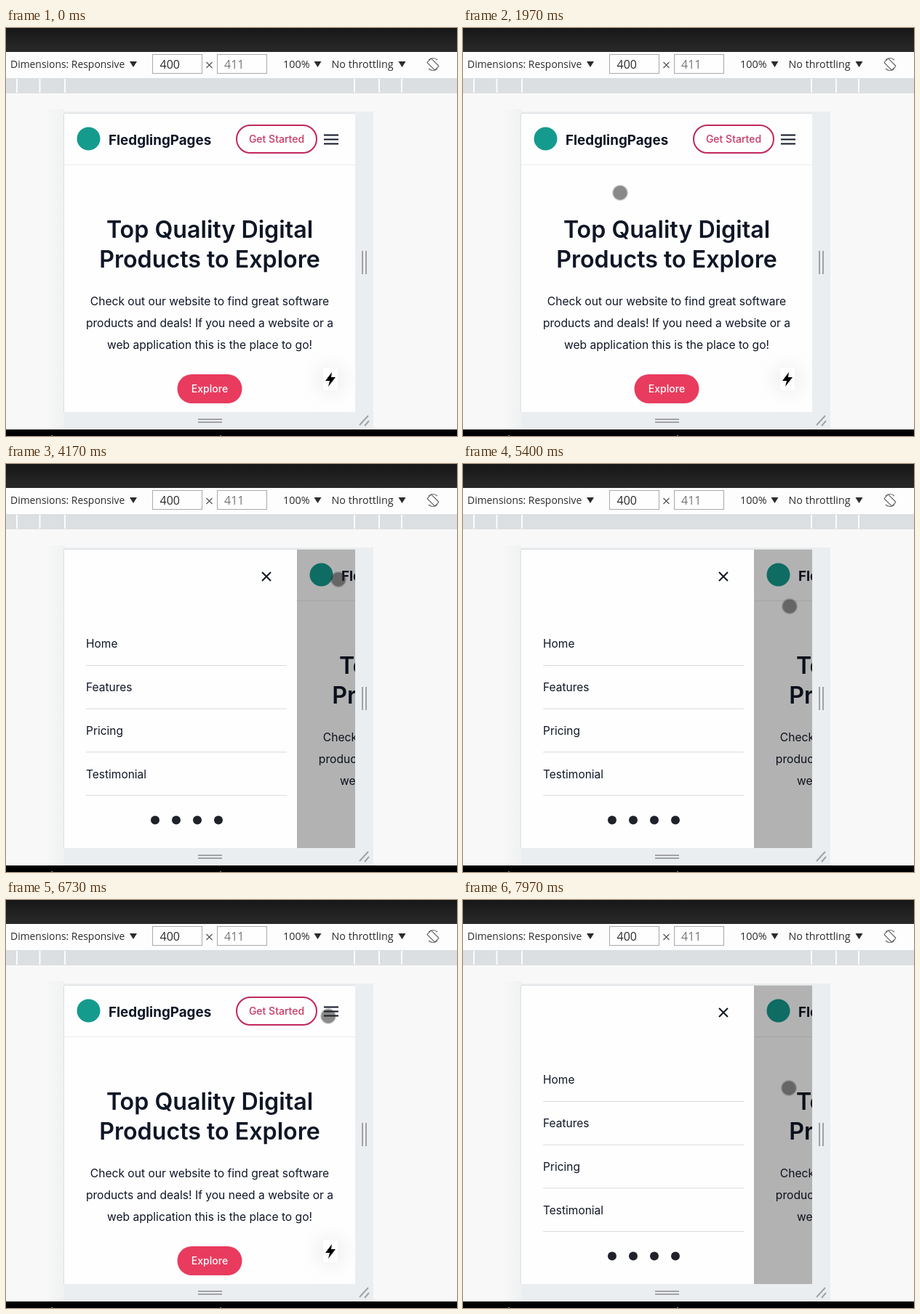
Recreate the animation shown at these times as an HTML page. Size 620 px wide and 562 px high, loop 8 s.

```html
<!DOCTYPE html>
<html lang="en">
<head>
<meta charset="utf-8">
<title>Responsive drawer menu</title>
<style>
  html, body { margin: 0; width: 100%; height: 100%; overflow: hidden; background: #f8f8f8; }
  svg { display: block; width: 620px; height: 562px; }
  .bar { font: 13.9px "Open Sans", "Noto Sans", sans-serif; fill: #2b2b2e; }
  .size { font-size: 16px; }
  .page { font-family: Inter, sans-serif; fill: #0f1626; }
  .brand { font-size: 18.8px; font-weight: 700; }
  .title { font-size: 32.2px; font-weight: 600; }
  .copy { font-size: 15.6px; }
  .button { font-size: 14px; font-weight: 500; }
  .middle { text-anchor: middle; }
  .grip { stroke: #a2a2a6; stroke-width: 2; fill: none; }
</style>
</head>
<body>
<svg viewBox="0 0 620 562">
  <defs>
    <clipPath id="screen"><rect x="80" y="118" width="400" height="411"/></clipPath>
    <linearGradient id="topbar" x2="0" y2="1">
      <stop stop-color="#171717"/><stop offset="1" stop-color="#292929"/>
    </linearGradient>
    <linearGradient id="edge">
      <stop stop-color="#f0f1f2" stop-opacity="0"/><stop offset="1" stop-color="#f0f1f2"/>
    </linearGradient>
    <radialGradient id="glow">
      <stop stop-color="#ededed"/><stop offset="1" stop-color="#fefefe" stop-opacity="0"/>
    </radialGradient>
  </defs>

  <rect width="620" height="562" fill="#f8f8f8"/>
  <rect width="620" height="33" fill="url(#topbar)"/>
  <rect y="33" width="620" height="36" fill="#fdfdfd"/>
  <rect y="69" width="620" height="21" fill="#dcdfe1"/>
  <path d="M15 70v19M46.500 70v19M81 70v19M479 70v19M513 70v19M544 70v19" stroke="#fbfbfb" stroke-width="2"/>

  <g class="bar">
    <text x="6" y="55">Dimensions: Responsive</text>
    <path d="M170 46h10l-5 8zM423.500 46h10l-5 8zM539.500 46h10l-5 8z"/>
    <g fill="#fefefe" stroke="#aaaaac">
      <rect x="201.500" y="36.500" width="68" height="26"/>
      <rect x="290.500" y="36.500" width="68" height="26"/>
    </g>
    <text class="size" x="211.500" y="55.500">400</text>
    <text class="size" x="300" y="55.500" fill="#77777a">411</text>
    <path d="M275.500 47l8 8m0-8l-8 8" stroke="#555558" stroke-width="1.200"/>
    <text x="381" y="55" font-size="14.400">100%</text>
    <text x="447.500" y="55" font-size="14.300">No throttling</text>
    <g fill="none" stroke="#66666a" stroke-width="1.200" transform="translate(587 50) rotate(-45)">
      <rect x="-4" y="-7.500" width="8" height="15" rx="1"/>
      <path d="M0-8.500a8.500 8.500 0 0 1 8.500 8.500M0 8.500a8.500 8.500 0 0 1-8.500-8.500"/>
    </g>
  </g>

  <rect x="54" y="112" width="26" height="441" fill="url(#edge)"/>
  <rect x="80" y="115" width="425" height="438" fill="#ebeef0"/>
  <path class="grip" d="M490 307v32M495 307v32M264 539h33M264 543h33M486 547l12-13M493 548l6-7"/>
  <rect y="553" width="620" height="9" fill="#000"/>
  <path d="M62 561.500h2M294 561.500h2" stroke="#888"/>

  <g clip-path="url(#screen)" class="page">
    <rect x="80" y="118" width="400" height="411" fill="#fefefe"/>
    <g id="view">
      <g id="content">
        <path d="M0 70.500h400" stroke="#ececee"/>
        <circle cx="33.500" cy="34.500" r="16" fill="#149b8e"/>
        <text class="brand" x="61" y="43">FledglingPages</text>
        <rect x="237" y="16" width="110" height="38" rx="19" fill="none" stroke="#c2285a" stroke-width="2"/>
        <text class="button middle" x="292" y="39.500" fill="#c63a66">Get Started</text>
        <path d="M357 29.500h20M357 35.500h20M357 41.500h20" stroke="#0f1626" stroke-width="2"/>
        <rect id="tap" x="354" y="22" width="26" height="26" fill="#33b5e5" opacity="0"/>
        <g class="middle">
          <g class="title">
            <text x="200" y="171">Top Quality Digital</text>
            <text x="200" y="212">Products to Explore</text>
          </g>
          <g class="copy">
            <text x="200" y="263.500">Check out our website to find great software</text>
            <text x="200" y="293.500">products and deals! If you need a website or a</text>
            <text x="200" y="323.500">web application this is the place to go!</text>
          </g>
          <rect x="155.500" y="359" width="89" height="40" rx="20" fill="#e93b5e"/>
          <text class="button" x="200" y="383.500" fill="#fefefe">Explore</text>
        </g>
      </g>
      <g id="bolt">
        <circle r="46" fill="url(#glow)"/>
        <rect x="-10" y="-16" width="20" height="31" rx="3" fill="#fefefe"/>
        <path d="M2-10L-7 2h6l-2 8L7-3H1z" fill="#000"/>
      </g>
      <rect id="mask" width="1000" height="900" fill="#000" opacity="0"/>
      <g id="drawer">
        <rect width="320" height="900" fill="#fefefe"/>
        <path d="M272 31l12 12m0-12l-12 12" stroke="#0f1626" stroke-width="2"/>
        <g id="links" font-size="15.500"></g>
        <g id="social" fill="#20222a"></g>
      </g>
    </g>
    <rect id="scrollbar" x="473" y="122" width="3" height="24" rx="1.500" fill="#b2b2b4" opacity="0"/>
    <g id="cursor" fill="#282828">
      <circle r="11" opacity=".2"/>
      <circle r="9.700" opacity=".43"/>
    </g>
  </g>
  <path d="M79.500 118v411M80 117.500h400" stroke="#dcdfe0"/>
</svg>

<script>
const LOOP = 8000, WIDTH = 320, SLIDE = 300;
const $ = id => document.getElementById(id);
const clamp = v => Math.min(1, Math.max(0, v));
const span = (t, from, length) => clamp((t - from) / length);
const smooth = p => p * p * (3 - 2 * p);

$("links").innerHTML = ["Home", "Features", "Pricing", "Testimonial"].map((label, i) =>
  `<text x="30" y="${134.5 + 60 * i}">${label}</text>
   <path d="M30 ${159.5 + 59.7 * i}h276" stroke="#d9d9dc"/>`).join("");
$("social").innerHTML = [0, 1, 2, 3].map(i =>
  `<circle cx="${125 + 29 * i}" cy="372.500" r="6"/>`).join("");

// Cubic-bezier(.78, .14, .15, .86), solved by bisection.
function slideEase(p) {
  const curve = (u, a, b) => 3 * u * (1 - u) * ((1 - u) * a + u * b) + u ** 3;
  let low = 0, high = 1;
  for (let i = 0; i < 20; i++) {
    const mid = (low + high) / 2;
    if (curve(mid, .78, .15) < p) low = mid; else high = mid;
  }
  return curve(low, .14, .86);
}

// Each step: time, x, y.
const path = [
  [1700, 66, 262], [1960, 216, 227], [2500, 216, 227], [3450, 457, 159],
  [4250, 457, 159], [4900, 449, 196], [6150, 449, 196], [6600, 443, 160],
  [7250, 443, 160], [7800, 448, 259], [LOOP, 448, 259]
];
function cursorAt(t) {
  const next = path.findIndex(step => step[0] > t);
  if (next < 1) return path[0].slice(1);
  const [a, b] = [path[next - 1], path[next]];
  const p = smooth((t - a[0]) / (b[0] - a[0]));
  return [a[1] + (b[1] - a[1]) * p, a[2] + (b[2] - a[2]) * p];
}

const OPEN = 3700, CLOSE = 5540, REOPEN = 6880;
const move = (id, x, y, scale = 1) =>
  $(id).setAttribute("transform", `translate(${x} ${y}) scale(${scale})`);
const fade = (id, value) => $(id).setAttribute("opacity", value);

function draw(t) {
  const open = slideEase(span(t, OPEN, SLIDE)) - slideEase(span(t, CLOSE, SLIDE))
    + slideEase(span(t, REOPEN, SLIDE));
  const shift = WIDTH * open;
  const closing = t > CLOSE && t < CLOSE + SLIDE;
  // The unlocked page zooms out to fit its overflow while the drawer leaves.
  const scale = closing ? 400 / (400 + shift) : 1;

  move("view", 80, 118, scale);
  move("content", shift, 0);
  move("bolt", 400 / scale - 34 + shift, 411 / scale - 45);
  move("drawer", shift - WIDTH, 0);
  fade("mask", .3 * (span(t, OPEN, SLIDE) - span(t, CLOSE, 220) + span(t, REOPEN, SLIDE)));

  const tapped = (t > 3580 && t < OPEN + 20) || (t > 6770 && t < REOPEN + 20);
  fade("tap", tapped ? .4 : 0);
  fade("scrollbar", t > CLOSE ? 1 - span(t, 6150, 300) : 0);

  const [x, y] = cursorAt(t);
  move("cursor", x, y);
  fade("cursor", t < 1700 ? 0 : 1);
}

const start = performance.now();
function tick() {
  draw((performance.now() - start) % LOOP);
  requestAnimationFrame(tick);
}
tick();
</script>
</body>
</html>
```
